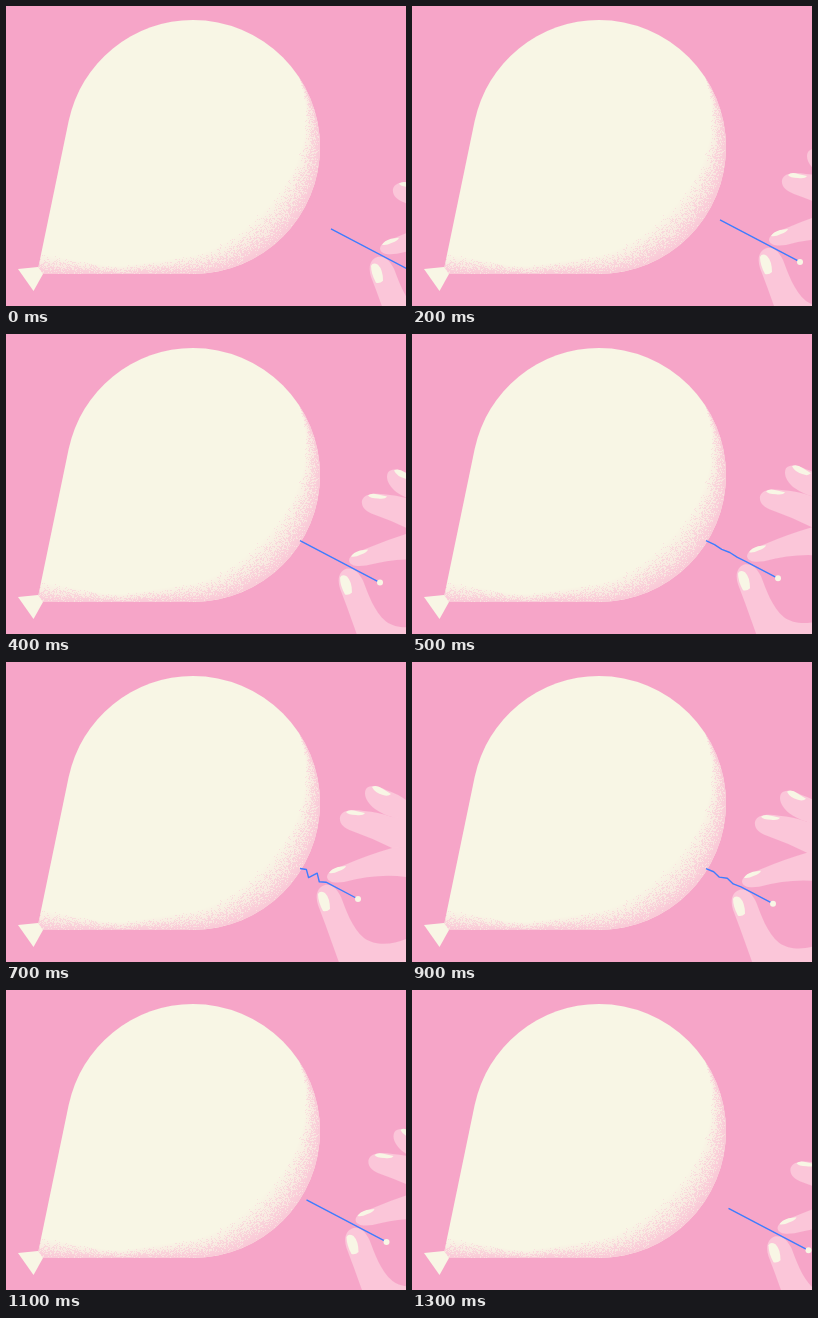
An HTML page with a canvas that plays this animation: 400 px wide and 300 px high, repeating every 1.4 s.

```html
<!DOCTYPE html>
<html lang="en">
<head>
<meta charset="utf-8">
<title>Balloon and needle</title>
<style>
  html, body { margin: 0; width: 100%; height: 100%; overflow: hidden; background: #f6a5c8; }
  canvas, svg { position: absolute; left: 0; top: 0; width: 400px; height: 300px; display: block; }
  .skin { fill: #fbc6d9; }
  .cream { fill: #f8f6e5; }
  #needle { fill: none; stroke: #3d7cff; stroke-width: 1.4; stroke-linejoin: round; }
</style>
</head>
<body>
<canvas id="balloon" width="400" height="300"></canvas>
<svg viewBox="0 0 400 300">
  <g id="hand">
    <g class="skin">
      <!-- ring finger, middle finger, index finger, thumb -->
      <path d="M480 160 L400 138 Q392 132 380 128 C372 124 364 122 360 127 C357 133 361 141 369 147 Q376 152 386 155 L400 190 L480 190Z"/>
      <path d="M480 170 L386 155 Q372 150 358 149 C346 147 336 148 334 155 C333 162 338 166 346 169 Q366 176 386 186 L400 200 L480 200Z"/>
      <path d="M480 180 L386 186 Q362 193 341 202 C331 206 321 209 321 215 C322 221 330 221 338 220 Q372 211 400 215 L480 230Z"/>
      <path d="M480 270 L400 277 C386 283 369 284 358 276 C346 266 340 248 335 235 C331 227 326 222 319 223 C311 225 309 234 312 243 Q319 261 326 281 L335 306 L360 370 L480 370Z"/>
    </g>
    <g class="cream">
      <path d="M366 125 Q370 122 377 127 L385 132 Q382 135 377 133 Q369 131 366 125Z"/>
      <path d="M340 150 Q343 147 350 149 L359 151 Q357 154 350 153 Q342 153 340 150Z"/>
      <path d="M323 211 Q325 207 332 205 L340 204 Q339 207 333 209 Q327 212 323 211Z"/>
      <path d="M312 232 Q314 228 319 231 Q324 236 324 247 Q321 250 317 249 Q312 240 312 232Z"/>
    </g>
  </g>
  <path id="needle"/>
  <circle id="bead" class="cream" r="3"/>
</svg>
<script>
  const CREAM = '#f8f6e5', BLUSH = '250,196,214';
  const CX = 187, CY = 141, R = 127;
  const $ = id => document.getElementById(id);

  function drawBalloon() {
    const c = $('balloon').getContext('2d');
    let seed = 7;
    const rand = () => (seed = seed * 16807 % 2147483647) / 2147483647;

    c.fillStyle = '#f6a5c8';
    c.fillRect(0, 0, 400, 300);

    const body = new Path2D();
    body.moveTo(CX, CY + R);
    body.arc(CX, CY, R, Math.PI / 2, Math.PI * 1.066, true);
    body.lineTo(32, 263);
    body.lineTo(34, 268);
    body.closePath();
    c.fillStyle = CREAM;
    c.fill(body);

    // Grainy shade that thins out away from the lower right rim
    c.save();
    c.clip(body);
    for (let y = 70; y < 269; y++) {
      for (let x = 30; x < 315; x++) {
        let depth, width;
        if (x < CX) {
          depth = CY + R - y;
          width = 9 + 13 * Math.max(0, 1 - (x - 32) / 70) + 11 * Math.max(0, 1 - (CX - x) / 70);
        } else {
          const a = Math.atan2(y - CY, x - CX);
          depth = R - Math.hypot(x - CX, y - CY);
          width = 20 + 14 * Math.sin(2 * a);
          if (a < 0) width = 20 * Math.max(0, 1 + a / 0.6);
        }
        if (depth > width) continue;
        const p = Math.pow(1 - Math.max(0, depth) / width, 1.2);
        const alpha = 0.5 * p + (rand() < p ? 0.42 : 0);
        c.fillStyle = `rgba(${BLUSH},${alpha})`;
        c.fillRect(x, y, 1, 1);
      }
    }
    c.restore();

    c.fillStyle = CREAM;
    c.beginPath();
    [[12, 263], [32, 261], [37, 268], [27.5, 285]].forEach(p => c.lineTo(...p));
    c.fill();
  }

  // Hand retreat along the needle at each 100 ms step
  const SHIFT = [53, 45, 36, 29, 22, 14, 6, 0, 3, 9, 18.5, 28.5, 37, 44.5];
  const SLOPE = 0.525, REST = 22;
  const KINKS = [[0.21, 2.1], [0.4, -4], [0.59, 3.9], [0.79, -2.7]];

  function pose(step) {
    const dx = SHIFT[step], dy = dx * SLOPE;
    const hx = 352 + dx, hy = 237 + dy;
    const free = Math.max(dx, REST);
    const tx = 272 + free, ty = 195 + free * SLOPE;
    const gx = hx - 32, gy = hy - 16.8;
    const bend = Math.max(0, 1 - dx / REST) ** 2;

    const pts = [[tx, ty]];
    if (bend) {
      for (const [f, v] of KINKS) {
        pts.push([tx + (gx - tx) * f + 0.465 * v * bend, ty + (gy - ty) * f - 0.885 * v * bend]);
      }
      pts.push([gx, gy]);
    }
    pts.push([hx, hy]);

    $('hand').setAttribute('transform', `translate(${dx} ${dy})`);
    $('needle').setAttribute('d', 'M' + pts.map(p => p.map(n => n.toFixed(2)).join(' ')).join('L'));
    $('bead').setAttribute('cx', hx);
    $('bead').setAttribute('cy', hy);
  }

  const start = performance.now();
  function tick() {
    const t = Math.max(0, performance.now() - start) % 1400;
    pose(Math.floor(t / 100));
    requestAnimationFrame(tick);
  }

  drawBalloon();
  tick();
</script>
</body>
</html>
```
